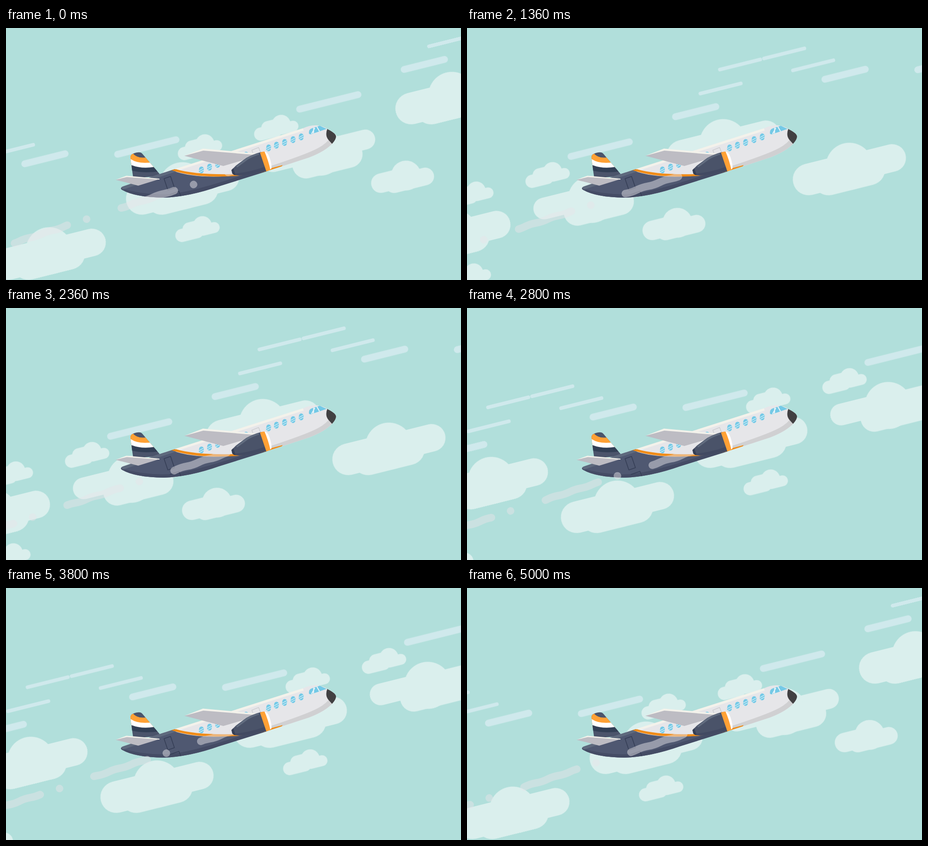
These frames come from a looping animation (1005 px wide and 557 px high, 5040 ms). An HTML page without scripts:

```html
<!DOCTYPE html>
<html lang="en">
<head>
<meta charset="utf-8">
<title>Plane in the clouds</title>
<style>
html, body { margin: 0; width: 100%; height: 100%; overflow: hidden; background: #b1dfdb; }
svg { display: block; width: 100%; height: 100%; }
.sky, .trail { animation: fly 5040ms steps(126) -2ms infinite; }
.trail {
  fill: none; stroke: #e6e4e8; stroke-width: 16.6; stroke-linecap: round; opacity: .48;
  stroke-dasharray: 123.1 44.8 .01 80.49;
  animation-name: puff;
}
.cloud { fill: #daefed; }
.streak { fill: none; stroke: #cfe9ec; stroke-linecap: round; }
/* 1168 px per 1001 ms along the flight line */
@keyframes fly { to { transform: translate(-5880.8px, 1466.2px); } }
@keyframes puff { to { stroke-dashoffset: 2390px; } }
</style>
</head>
<body>
<svg viewBox="0 0 1005 557" preserveAspectRatio="xMidYMid slice">
<defs>
  <g id="big">
    <rect x="-35" y="-35" width="140" height="70" rx="35"/>
    <circle cx="94.3" cy="-6.4" r="52"/>
    <rect x="70" y="-31.9" width="151" height="61" rx="30.5"/>
    <rect x="7.7" y="-24.3" width="162.7" height="70" rx="35"/>
  </g>
  <g id="wide">
    <rect x="-24" y="-24" width="140" height="48" rx="24"/>
    <circle cx="105.8" cy="5.7" r="52"/>
    <rect x="90" y="-19.3" width="141.6" height="44" rx="22"/>
    <rect x="38.9" y="-4.5" width="158" height="60" rx="30"/>
  </g>
  <g id="mid">
    <rect x="-21.5" y="-21.5" width="85" height="43" rx="21.5"/>
    <circle cx="58" cy="-3" r="33"/>
    <rect x="8.2" y="-10.3" width="110" height="39" rx="19.5"/>
  </g>
  <g id="small">
    <rect x="-14.5" y="-14.5" width="63.5" height="29" rx="14.5"/>
    <rect x="4.4" y="-24.6" width="50" height="30" rx="15"/>
    <circle cx="49.4" cy="-10.4" r="20.7"/>
    <rect x="36" y="-11.8" width="49.5" height="24" rx="12"/>
  </g>
  <path id="long" d="M-66.5 0h133" stroke-width="15"/>
  <path id="short" d="M-46 0h92" stroke-width="15"/>
  <path id="thin" d="M-46 0h92" stroke-width="8"/>

  <g id="tile">
    <g class="streak">
      <use href="#long" transform="translate(311 263) rotate(-14)"/>
      <use href="#long" transform="translate(713 163.3) rotate(-14)"/>
      <use href="#short" transform="translate(86 289) rotate(-14)"/>
      <use href="#short" transform="translate(924 80.5) rotate(-14)"/>
      <use href="#thin" transform="translate(-146 267.5) rotate(-14)"/>
      <use href="#thin" transform="translate(-48.5 243) rotate(-14)"/>
      <use href="#thin" transform="translate(15.5 269.3) rotate(-14)"/>
      <use href="#thin" transform="translate(-189 320.5) rotate(-14)"/>
    </g>
    <g class="cloud">
      <use href="#big" transform="translate(5.5 521.5) rotate(-14)"/>
      <use href="#big" transform="translate(300 377.7) rotate(-14)"/>
      <use href="#big" transform="translate(895 178) rotate(-14)"/>
      <use href="#wide" transform="translate(589.5 294.5) rotate(-14)"/>
      <use href="#mid" transform="translate(828 343) rotate(-14)"/>
      <use href="#small" transform="translate(394 277.5) rotate(-14)"/>
      <use href="#small" transform="translate(562.5 234.5) rotate(-14)"/>
      <use href="#small" transform="translate(388.5 458.5) rotate(-14)"/>
    </g>
  </g>

  <clipPath id="pane"><rect x="-5.2" y="-7.6" width="10.4" height="15.2" rx="5.2"/></clipPath>
  <g id="win" clip-path="url(#pane)">
    <path fill="#74c9e6" d="M-6-8h12v16h-12z"/>
    <path stroke="#c9ebf5" stroke-width="1.6" d="M-6 3L6-6M-6 8L6-1"/>
  </g>
  <clipPath id="fin"><path d="M281 332L275 288Q274 281 280 278Q297 271 302 279L343 327Z"/></clipPath>
  <clipPath id="hull"><path d="M254 354Q255 351 259 350L366 314L655 222Q672 214 686 215Q702 217 711 224Q729 233 729 240Q729 246 721 255Q706 272 670 286L575 317L470 350Q405 373 348 375Q285 374 257 358Q253 356 254 354Z"/></clipPath>
  <clipPath id="glass"><path d="M669 232Q669 224 675 222L693 216L708 223L691 229L673 235Q669 235 669 232Z"/></clipPath>
</defs>

<rect width="1005" height="557" fill="#b1dfdb"/>
<g class="sky">
  <use href="#tile"/>
  <use href="#tile" x="1168" y="-291.2"/>
  <use href="#tile" x="2336" y="-582.4"/>
  <use href="#tile" x="3504" y="-873.6"/>
  <use href="#tile" x="4672" y="-1164.8"/>
  <use href="#tile" x="5840" y="-1456"/>
  <use href="#tile" x="7008" y="-1747.2"/>
</g>

<g clip-path="url(#fin)">
  <path fill="#4b546b" d="M270 268h80v70h-80z"/>
  <path fill="#ffa135" d="M270 276H279Q290 289 309 286L330 296V310H270Z"/>
  <path fill="#fff" d="M270 288L276 290Q292 301 322 297L335 310H270Z"/>
  <path fill="#323f55" d="M270 301L277 303Q300 312 328 307L345 316Q300 323 270 313Z"/>
</g>

<g clip-path="url(#hull)">
  <path fill="#e6e6e9" d="M240 205h500v180H240z"/>
  <path fill="#d0d0d2" d="M560 313Q650 284 680 270Q702 260 712 248L735 250L700 290L560 330Z"/>
  <path stroke="#f3f2eb" stroke-width="10" d="M360 316L656 222"/>
  <path fill="#4f5871" d="M240 345L340 321L370 316Q420 334 510 326L575 313V330L400 390H240Z"/>
  <path fill="#444c65" d="M240 350Q300 371 365 367Q430 359 576 307V330L400 390H240Z"/>
  <path fill="#5e697d" d="M252 352L372 311L376 317L259 357Z"/>
  <path fill="#f08c18" d="M365 314L375 312Q420 325 502 323Q560 318 611 303L609 306L575 317L510 327Q420 333 365 314Z"/>
  <path fill="#414042" d="M710 222Q704 237 712 247L721 257H740V222Z"/>
</g>

<g clip-path="url(#glass)">
  <path fill="#74c9e6" d="M665 212h46v26h-46z"/>
  <path fill="none" stroke="#e9f4f8" stroke-width="2.2" d="M680 217L679 236M686 217L694 231M675 234L682 221"/>
</g>
<use href="#win" transform="translate(431.5 313.8) rotate(8)"/>
<use href="#win" transform="translate(449.5 307.5) rotate(8)"/>
<use href="#win" transform="translate(467.5 301.3) rotate(8)"/>
<use href="#win" transform="translate(530 281) rotate(8)"/>
<use href="#win" transform="translate(580 265) rotate(8)"/>
<use href="#win" transform="translate(597.3 259) rotate(8)"/>
<use href="#win" transform="translate(615.3 253) rotate(8)"/>
<use href="#win" transform="translate(634 246.8) rotate(8)"/>
<use href="#win" transform="translate(652 240.7) rotate(8)"/>

<g fill="none" stroke-width="1.6" stroke-linejoin="round">
  <path stroke="#cdced1" d="M551 293L543 270L558 264L567 288"/>
  <path stroke="#343d55" d="M349 333L363.500 328L372 353L357.500 358ZM362 368L382 361L386 371"/>
</g>

<path fill="#bdbcc3" d="M242 335.500L267 328L339 334L292 348.500Z"/>
<path fill="#f3f2eb" d="M242 335.500L266 326.500L339 333V335L267 329.500Z"/>

<g transform="translate(-217.5 552.4) rotate(-18.18)">
  <path class="trail" pathLength="780" d="M0 0q13-2 26 0t26 0t26 0t26 0t26 0t26 0t26 0t26 0t26 0t26 0t26 0t26 0t26 0t26 0t26 0t26 0t26 0t26 0t26 0t26 0t26 0t26 0t26 0t26 0t26 0t26 0t26 0t26 0t26 0t26 0"/>
</g>

<path fill="#bdbcc3" d="M394 282.500L436 268L553 278L562 281L480 305Z"/>
<path fill="#f3f2eb" d="M394 282.500L435 266.500L556 277.500L545 280L436 271Z"/>

<path fill="#4a5369" d="M498 314L508 304L531 287Q545 279 564 274L577 316L541 323Q520 327 505 325L500 322Z"/>
<path fill="#424a62" d="M502 322Q540 319 573 306L577 316L541 323Q520 327 505 325Z"/>
<path fill="#626d80" d="M508 306L532 287Q544 280 558 277L559 280Q545 284 534 291L511 308Z"/>
<path fill="#343e54" d="M498 314L502 310L507 325L504 325L500 322Z"/>
<path fill="#fff" d="M569 273.500Q577 271 582 286Q588 304 586 311L580 315Z"/>
<path fill="#ffa135" d="M561 275.500Q565 273 571 273Q579 291 584 313.500L575 317Z"/>
</svg>
</body>
</html>
```
